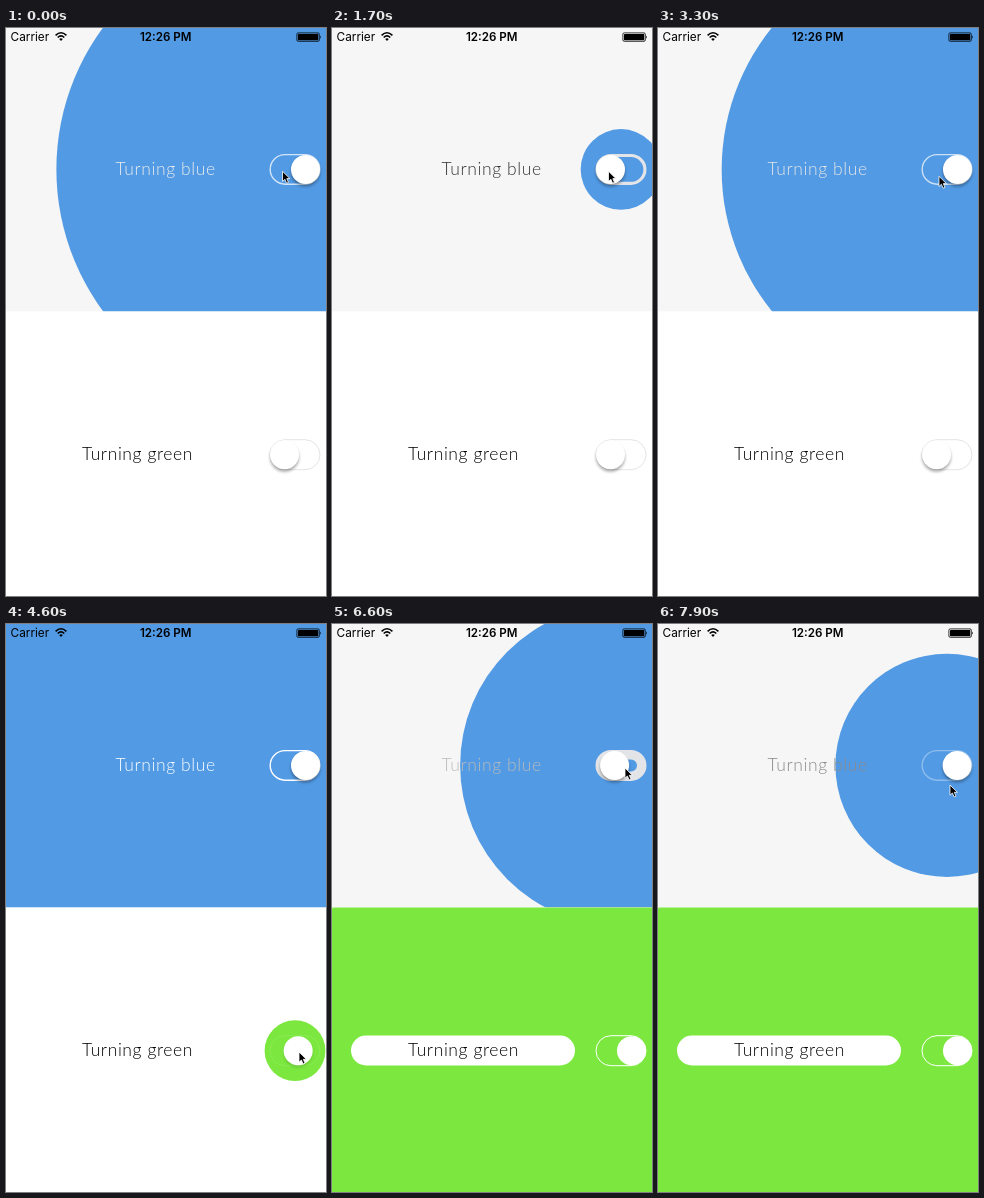
An HTML page for the animation above (8 s loop, 320x568 px).

```html
<!DOCTYPE html>
<html lang="en">
<head>
<meta charset="utf-8">
<title>Paper switches</title>
<style>
  html, body { margin: 0; width: 100%; height: 100%; overflow: hidden; background: #fff; }
  svg { display: block; width: 100vw; height: 100vh; }
  .label { font: 300 17.5px Lato, "Open Sans", sans-serif; letter-spacing: .6px; text-anchor: middle; }
  .status { font: 11.8px Inter, "Liberation Sans", sans-serif; }
  .clock { font-weight: 600; font-size: 11.6px; text-anchor: middle; }
</style>
</head>
<body>
<svg id="stage" viewBox="0 0 320 568">
  <defs>
    <clipPath id="topClip"><rect width="320" height="283.6"/></clipPath>
    <clipPath id="bottomClip"><rect y="283.6" width="320" height="284.4"/></clipPath>
    <filter id="soft" x="-50%" y="-50%" width="200%" height="200%"><feGaussianBlur stdDeviation="1.8"/></filter>
  </defs>
  <g id="panels"></g>
  <g id="statusBar">
    <text class="status" x="4.6" y="13.3">Carrier</text>
    <g fill="none" stroke="#000" stroke-width="1.6">
      <path d="M49.6 7.3 Q55 2.2 60.4 7.3"/>
      <path d="M51.7 9.5 Q55 6.3 58.3 9.5"/>
    </g>
    <path d="M53.2 11.1 Q55 9.6 56.8 11.1 L55 13.1 Z"/>
    <text class="status clock" x="159.7" y="13.3">12:26 PM</text>
    <rect x="290.9" y="4.9" width="22.4" height="8.4" rx="1.3" fill="none" stroke="#000" stroke-width=".8"/>
    <rect x="292" y="6" width="20.2" height="6.2" rx=".4"/>
    <path d="M314.2 7.5 Q315.8 9 314.2 10.8 Z"/>
  </g>
  <path id="cursor" d="M0 0 V10.2 L2.4 8 L4.1 11.9 L6 11.1 L4.3 7.3 H7.4 Z"
        fill="#000" stroke="#fff" stroke-width=".8" stroke-linejoin="round"/>
</svg>
<script>
const LOOP = 8000, DURATION = 350, FULL_RADIUS = 322;
const LEFT = 263.5, WIDTH = 51, HEIGHT = 31, OFF_X = 278.5, ON_X = 299.5;

const clamp = (v) => Math.min(1, Math.max(0, v));
const mix = (a, b, k) => a + (b - a) * k;
const smooth = (k) => k * k * (3 - 2 * k);

// cubic-bezier(.42, 0, 1, 1)
function easeIn(x) {
  let lo = 0, hi = 1;
  for (let i = 0; i < 24; i++) {
    const s = (lo + hi) / 2, r = 1 - s;
    if (1.26 * s * r * r + 3 * s * s * r + s * s * s < x) lo = s; else hi = s;
  }
  return smooth(lo);
}

function add(parent, tag, attrs) {
  const node = document.createElementNS("http://www.w3.org/2000/svg", tag);
  parent.appendChild(node);
  set(node, attrs);
  return node;
}
function set(node, attrs) {
  for (const key in attrs) node.setAttribute(key, attrs[key]);
}

// flips: [time, turned on, how long the press is held before it]
const panels = [
  { top: 0, clip: "topClip", back: "#f6f6f6", color: "#529ae4", text: "Turning blue", textX: 159.6,
    fades: true, cy: 141.4, border: 1.4,
    flips: [[-292, 1, 140], [1453, 0, 260], [3018, 1, 140], [6480, 0, 140], [7715, 1, 140]] },
  { top: 283, clip: "bottomClip", back: "#ffffff", color: "#7ce83f", text: "Turning green", textX: 131.5,
    fades: false, cy: 426.7, border: 1,
    flips: [[-5000, 0, 0], [4512, 1, 140]] }
];

function build(p) {
  const g = add(document.getElementById("panels"), "g", { "clip-path": `url(#${p.clip})` });
  add(g, "rect", { y: p.top, width: 320, height: 285, fill: p.back });
  p.circle = add(g, "circle", { cx: 289, cy: p.cy, fill: p.color });
  if (!p.fades) add(g, "rect", { x: 19, y: 411.5, width: 224, height: 30, rx: 15, fill: "#fff" });
  p.label = add(g, "text", { class: "label", x: p.textX, y: p.cy + 5.7 });
  p.label.textContent = p.text;
  p.track = add(g, "rect", { fill: "none", stroke: "#e3e4e7" });
  p.ring = add(g, "rect", { fill: "none", stroke: "#fff" });
  p.shadow = add(g, "rect", { height: 29, rx: 14.5, y: p.cy - 12, fill: "#000", filter: "url(#soft)" });
  p.thumb = add(g, "rect", { height: 29, rx: 14.5, y: p.cy - 14.5, fill: "#fff" });
}

// Pill outline whose stroke grows inwards from the switch bounds
function outline(node, cy, w, opacity) {
  set(node, {
    x: LEFT + w / 2, y: cy - HEIGHT / 2 + w / 2, width: WIDTH - w, height: HEIGHT - w,
    rx: (HEIGHT - w) / 2, "stroke-width": w, opacity
  });
}

function pressAmount(p, t) {
  return p.flips.reduce((most, [time, , lead]) => Math.max(most,
    t < time ? clamp((t - time + lead) / 120) : lead && clamp(1 - (t - time) / 90)), 0);
}

function drawPanel(p, t) {
  const [start, on] = p.flips.filter(([time]) => time <= t).pop();
  const age = t - start, k = clamp(age / DURATION);
  const grown = easeIn(on ? k : 1 - k);
  const white = smooth(on ? k : 1 - k);
  p.circle.setAttribute("r", FULL_RADIUS * grown);

  const shade = p.fades ? Math.round(255 * white) : 0;
  p.label.setAttribute("fill", `rgb(${shade},${shade},${shade})`);

  outline(p.track, p.cy, on ? 1 : Math.max(1, 15.5 - age * .05), on ? clamp(1 - age / 70) : 1);
  outline(p.ring, p.cy, p.border, on ? grown : 0);

  const slide = 1 - (1 - clamp(age / 215)) ** 2;
  const x = mix(OFF_X, ON_X, on ? slide : 1 - slide);
  const stretch = 7 * smooth(pressAmount(p, t));
  const left = x - 14.5 - (x > 289 ? stretch : 0);
  set(p.thumb, { x: left, width: 29 + stretch });
  set(p.shadow, {
    x: left, width: 29 + stretch,
    opacity: p.fades ? .33 : .33 * (on ? 1 - slide : 1)
  });
}

// Pointer stops: [time, x, y]
const stops = [
  [0, 276.5, 143.3], [2150, 276.5, 143.3], [2850, 281, 148.3], [3850, 281, 148.3], [4450, 293, 428],
  [5700, 293, 428], [6350, 293, 144], [7480, 293, 144], [7640, 292, 153], [7720, 292, 153],
  [7880, 292, 161], [LOOP, 292, 161]
];
function drawCursor(t) {
  const i = stops.findIndex(([time]) => time > t);
  const [t0, x0, y0] = stops[i - 1], [t1, x1, y1] = stops[i];
  const k = smooth((t - t0) / (t1 - t0));
  set(document.getElementById("cursor"), { transform: `translate(${mix(x0, x1, k)} ${mix(y0, y1, k)})` });
}

function draw(t) {
  panels.forEach((p) => drawPanel(p, t));
  drawCursor(t);
}

panels.forEach(build);
draw(0);
let origin = null;
requestAnimationFrame(function tick(now) {
  if (origin === null) origin = now;
  draw(Math.max(0, now - origin) % LOOP);
  requestAnimationFrame(tick);
});
</script>
</body>
</html>
```
